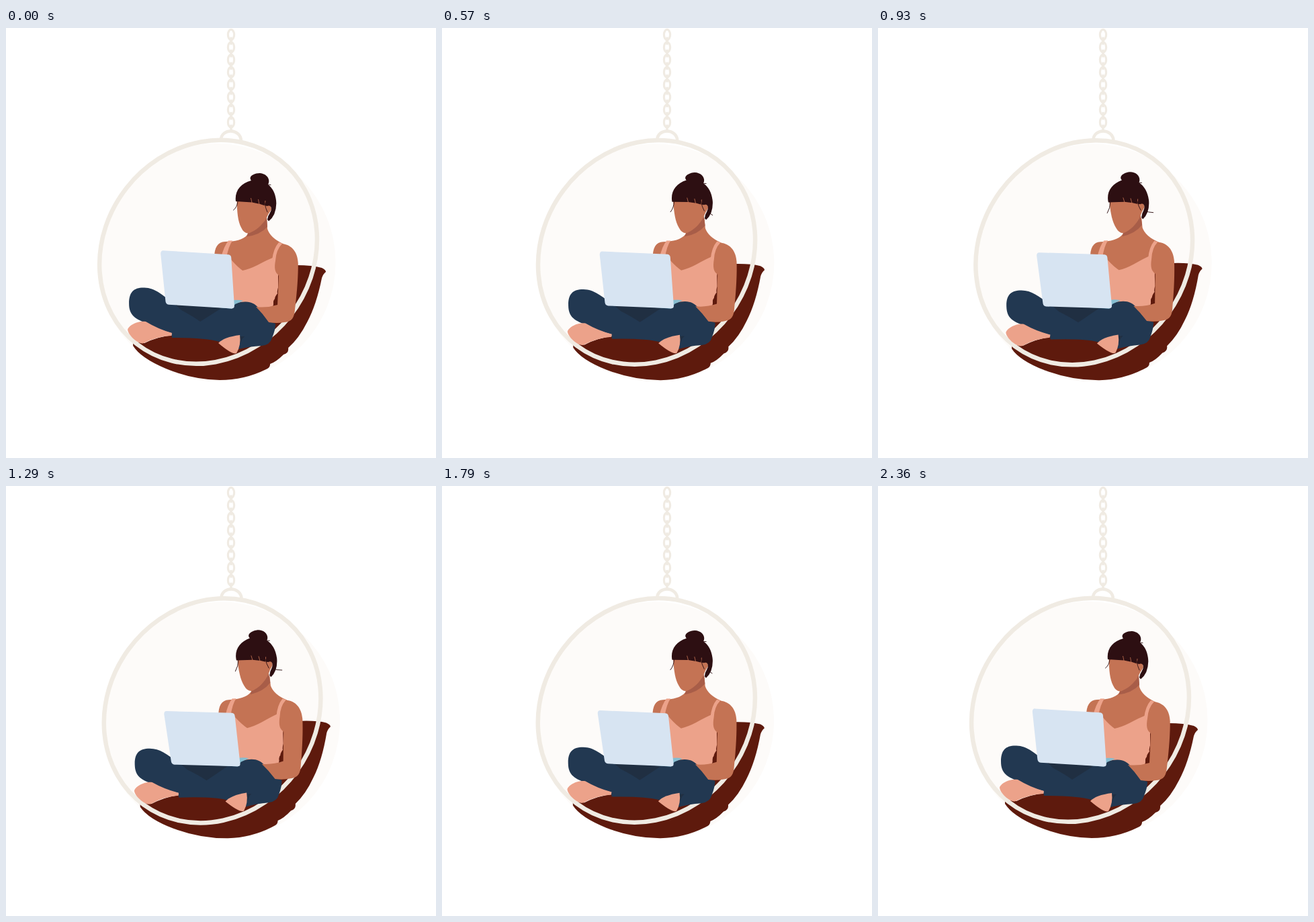
These frames come from a looping animation (640x640 px, 2.43 s). An HTML page:

```html
<!DOCTYPE html>
<html lang="en">
<head>
<meta charset="utf-8">
<title>Hanging chair</title>
<style>
  html, body { margin: 0; width: 100%; height: 100%; overflow: hidden; background: #fff; }
  svg { display: block; width: 100vw; height: 100vh; }
  .cream { fill: none; stroke: #f0ebe3; }
  .skin { fill: #c47354; }
  .pink { fill: #eca28a; }
  .jeans { fill: #223851; }
  .hair { fill: #2d0f12; }
  .strand { fill: none; stroke: #2d0f12; stroke-width: .9; stroke-linecap: round; }
</style>
</head>
<body>
<svg viewBox="0 0 640 640">
  <g id="chain" class="cream"></g>

  <g id="swing">
    <circle cx="313.5" cy="349" r="177" fill="#fdfbf9"/>
    <path class="cream" stroke-width="4.6" d="M320 168 V166 C321 149 349 149 350 168"/>

    <!-- cushion -->
    <path fill="#5e1a0d" d="M404 364 L432 353 Q456 353 470 357 Q476 360 476 363
      Q472 366 470 372 Q462 412 448 438 Q436 462 420 476 Q421 484 413 486 Q402 497 393 500 Q393 505 389 507
      Q356 524 318 524 Q277 523 238 507 Q200 491 189 473 L189 467 L206 469 Q226 459 250 457
      L320 463 L392 440 L397 412 Z"/>
    <ellipse class="cream" stroke-width="6.5" cx="301" cy="333.3" rx="173.4" ry="154.5" transform="rotate(-52 301 333.3)"/>

    <!-- torso -->
    <path class="skin" d="M310 342 C310 327 315 318 326 318 C341 318 353 315 359 308 L388 284 L389 299
      Q393 312 412 321 L407 362 L397 400 L325 400 Z"/>
    <path class="pink" d="M318 340 L331 340 L337 347 Q345 356 352 361 Q362 359 374 353 Q391 344 399 341
      L405 364 L405 386 Q403 393 404 395 Q400 400 400 403 Q397 406 398 411 L396 420 L325 420 Z"/>
    <path class="pink" d="M331 316.5 L337 316.5 Q331 325 328 342 L320 342 Q324 325 331 316.5 Z"/>
    <path class="pink" d="M406 319 L413 321.5 Q405 329 402 350 L396 345 Q398 328 406 319 Z"/>

    <!-- legs -->
    <path class="jeans" d="M183 410 C183 393 190 386 206 386.5 C222 387 232 397 250 410 L290 414 L330 415
      Q344 407 357 407.5 C374 408 378 421 386 430 Q393 438 401 440 Q401 449 396 461 Q393 472 380 473
      Q362 474 346 478 L318 467 Q297 461 247 461 L246 454 Q226 449 213 441 C192 433 183 428 183 410 Z"/>
    <path fill="#202f42" d="M250 410 L322 416 Q308 425 289 437 Q278 429 261 420 Z"/>
    <path fill="#202f42" d="M347 459 L355 459 Q350 463 349 470 Z"/>
    <path class="pink" d="M181 449 C182 443 196 435 208 437 Q226 448 247 454 L246 458 Q224 459 205 469 C198 472 182 458 181 449 Z"/>
    <path class="pink" d="M316 469 Q324 460 348 457 Q350 472 343 484 Q337 487 316 469 Z"/>

    <!-- front arm -->
    <path class="skin" d="M411 321 C426 323 434 334 434.7 350 Q435 377 430 418 C429 431 426 437 414 438
      Q403 440 391 438 Q382 425 372 415 Q388 417 404 412 Q405 390 406 368 C400 364 399 357 401 346 Q402 330 411 321 Z"/>

    <!-- laptop -->
    <path fill="#86bdd0" d="M249 410 L336 417.8 L341 411 L353 406 Q346 404 337 405 L330 410 Z"/>
    <g id="lid">
      <path fill="#d7e4f2" d="M234 331.3 L331 337.3 Q334.8 337.8 335.1 342 L339.8 413.5 Q340 417.6 336 417.4
        L242 411.7 Q238 411 237.4 407 L230 336 Q230 331 234 331.3 Z"/>
    </g>

    <g id="head">
      <path fill="#a85d48" d="M360 305 Q376 302 388 281 L389 296 Q378 308 358 310.5 Z"/>
      <path class="skin" d="M343.5 256 C344 275 345 287 350 297 Q354 306 361 305.5 C371 302 381 294 387 284
        Q390 277 395 270 Q395 262 388 262 L384 254 Z"/>
      <path class="hair" d="M342 258 C340 243 349 231 365 227 C360 221 369 216 378 216 C389 217 394 226 390 233
        C398 239 402 249 402.3 261 Q402 279 391 287.5 L389 285 Q390 279 393 275 C397 268 394 263 389 265
        L384 264 L378 262 L366 259.5 Z"/>
      <path fill="none" stroke="#c47354" stroke-width=".8" d="M364.5 253 L366 260 M375.5 255 L377 263 M386 257 L385 265"/>
      <path class="strand" d="M385 260 Q386 268 389 274 M389 233 L394 233.5"/>
      <path class="strand" id="locks"/>
    </g>
  </g>
</svg>
<script>
  const LOOP = 2430, STEPS = 34, PEAK = 16.3;
  const byId = id => document.getElementById(id);
  const lerp = (a, b, k) => (a + (b - a) * k).toFixed(2);

  byId('chain').innerHTML = Array.from({ length: 8 }, (_, i) => {
    const y = 10 + i * 18.6;
    return `<ellipse cx="335" cy="${y}" rx="4.6" ry="7.6" stroke-width="3.2"/>
      <path d="M335 ${y + 5} V${y + 13.5}" stroke-width="3.6" stroke-linecap="round"/>`;
  }).join('');

  function draw(ms) {
    // the motion advances in even steps
    const step = Math.floor((ms % LOOP) / LOOP * STEPS + 0.1) % STEPS;
    const turn = 2 * Math.PI / STEPS;
    const sway = 1.03 * Math.pow((1 + Math.cos((step - PEAK) * turn)) / 2, 0.85);
    const tilt = Math.sin((step + 1.5) * turn) - 0.2;

    byId('swing').setAttribute('transform', `rotate(${-1.88 * sway} 335 150)`);
    byId('head').setAttribute('transform', `rotate(${-3.5 * sway} 368 303)`);

    const skew = -0.018 * tilt, stretch = 1 + 0.009 * tilt;
    byId('lid').setAttribute('transform',
      `matrix(1 0 ${skew} ${stretch} ${-skew * 414} ${414 * (1 - stretch)})`);

    byId('locks').setAttribute('d',
      `M345 258 Q344 267 ${lerp(338.5, 339, sway)} ${lerp(271, 274, sway)}` +
      `M394 274 Q${lerp(392, 400, sway)} 279 ${lerp(391, 408, sway)} ${lerp(284, 279, sway)}`);
  }

  const start = performance.now();
  function tick() {
    draw(performance.now() - start);
    requestAnimationFrame(tick);
  }
  tick();
</script>
</body>
</html>
```
